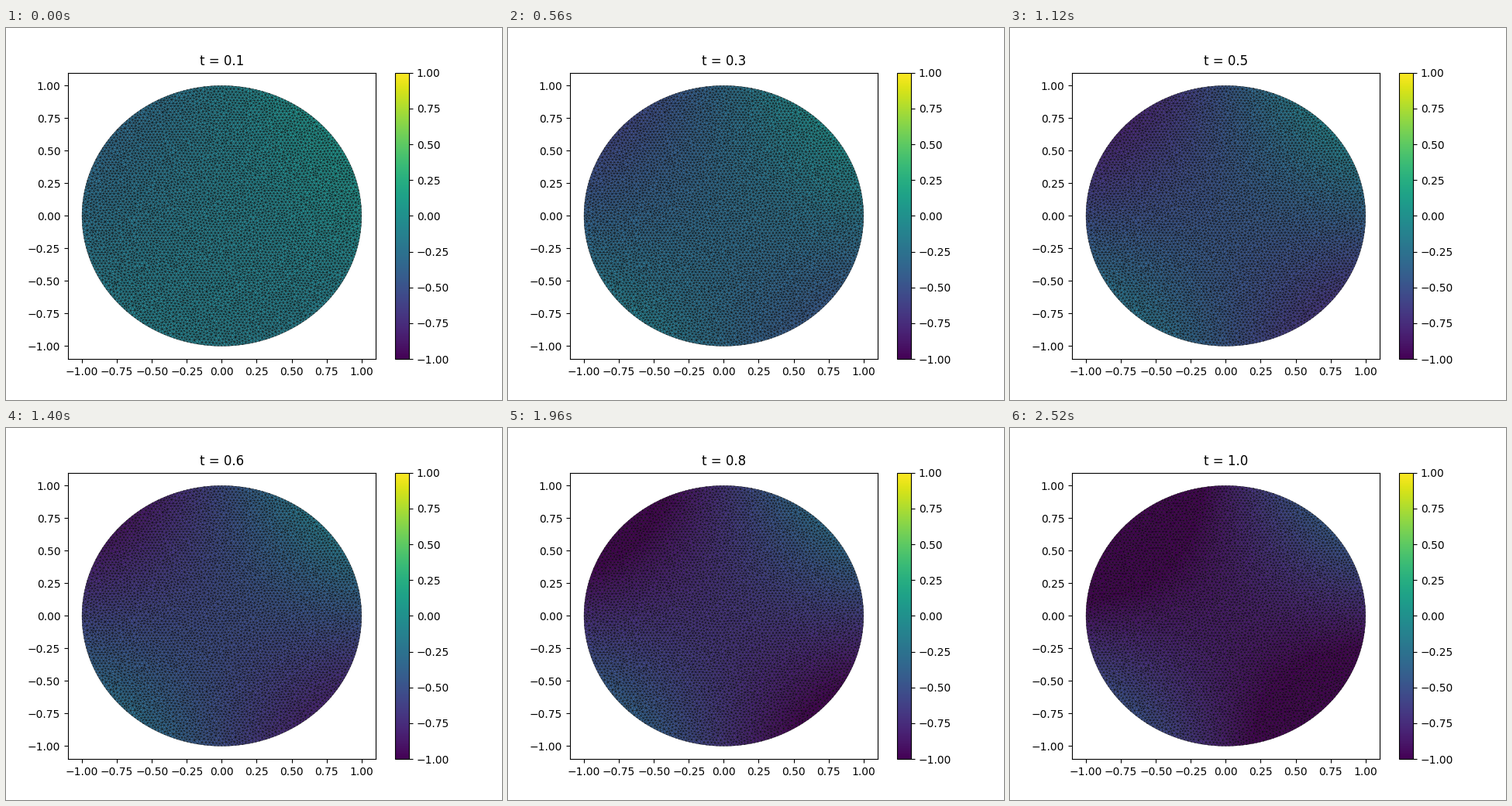
Recreate the animation shown at these times as a matplotlib script. Size 640x480 px, loop 2.8 s.

```python
import numpy as np
import matplotlib.pyplot as plt
from matplotlib.animation import FuncAnimation
from matplotlib.tri import Triangulation

FRAMES = 10
INTERVAL = 280
RIM_NODES = 252  # a multiple of four puts nodes on both axes


def disc_mesh(rim_nodes, smoothing=5):
    """Unstructured triangulation of the unit disc."""
    rng = np.random.default_rng(3)
    h = 2 * np.pi / rim_nodes
    angle = h * np.arange(rim_nodes)
    rim = np.column_stack([np.cos(angle), np.sin(angle)])

    reach = int(1.2 / h)
    rows, cols = np.mgrid[-reach:reach + 1, -reach:reach + 1]
    grid = np.column_stack([((cols + rows % 2 / 2) * h).ravel(),
                            (rows * h * np.sqrt(3) / 2).ravel()])
    grid += rng.uniform(-0.42, 0.42, grid.shape) * h
    inner = grid[np.hypot(*grid.T) < 1 - 0.6 * h]
    points = np.vstack([rim, inner])

    # Pull each inner node towards the mean of its neighbours.
    for _ in range(smoothing):
        edges = Triangulation(*points.T).edges
        total = np.zeros_like(points)
        count = np.zeros(len(points))
        for a, b in (edges.T, edges.T[::-1]):
            np.add.at(total, a, points[b])
            np.add.at(count, a, 1)
        mean = total / count[:, None]
        points[rim_nodes:] = (0.4 * points + 0.6 * mean)[rim_nodes:]
    return Triangulation(*points.T)


def field(x, y, t):
    """Falling mean, fading tilt and growing saddle."""
    mean = -0.05 - 0.81 * t
    tilt = 0.13 * np.exp(-t)
    saddle = 0.45 * (1 - np.exp(-2.1 * t))
    return mean + tilt * x + saddle * 2 * x * y


mesh = disc_mesh(RIM_NODES)
cx = mesh.x[mesh.triangles].mean(axis=1)
cy = mesh.y[mesh.triangles].mean(axis=1)

fig, ax = plt.subplots(figsize=(6.4, 4.8), dpi=100)
cells = ax.tripcolor(mesh, facecolors=field(cx, cy, 0.1), edgecolors="k",
                     cmap="viridis", vmin=-1, vmax=1)
fig.colorbar(cells, ax=ax)
title = ax.set_title("t = 0.1", pad=6.7)


def update(i):
    t = 0.1 * (i + 1)
    cells.set_array(field(cx, cy, t))
    title.set_text(f"t = {t:.1f}")
    return cells, title


anim = FuncAnimation(fig, update, frames=FRAMES, interval=INTERVAL,
                     repeat=True, repeat_delay=0)
plt.show()
```
